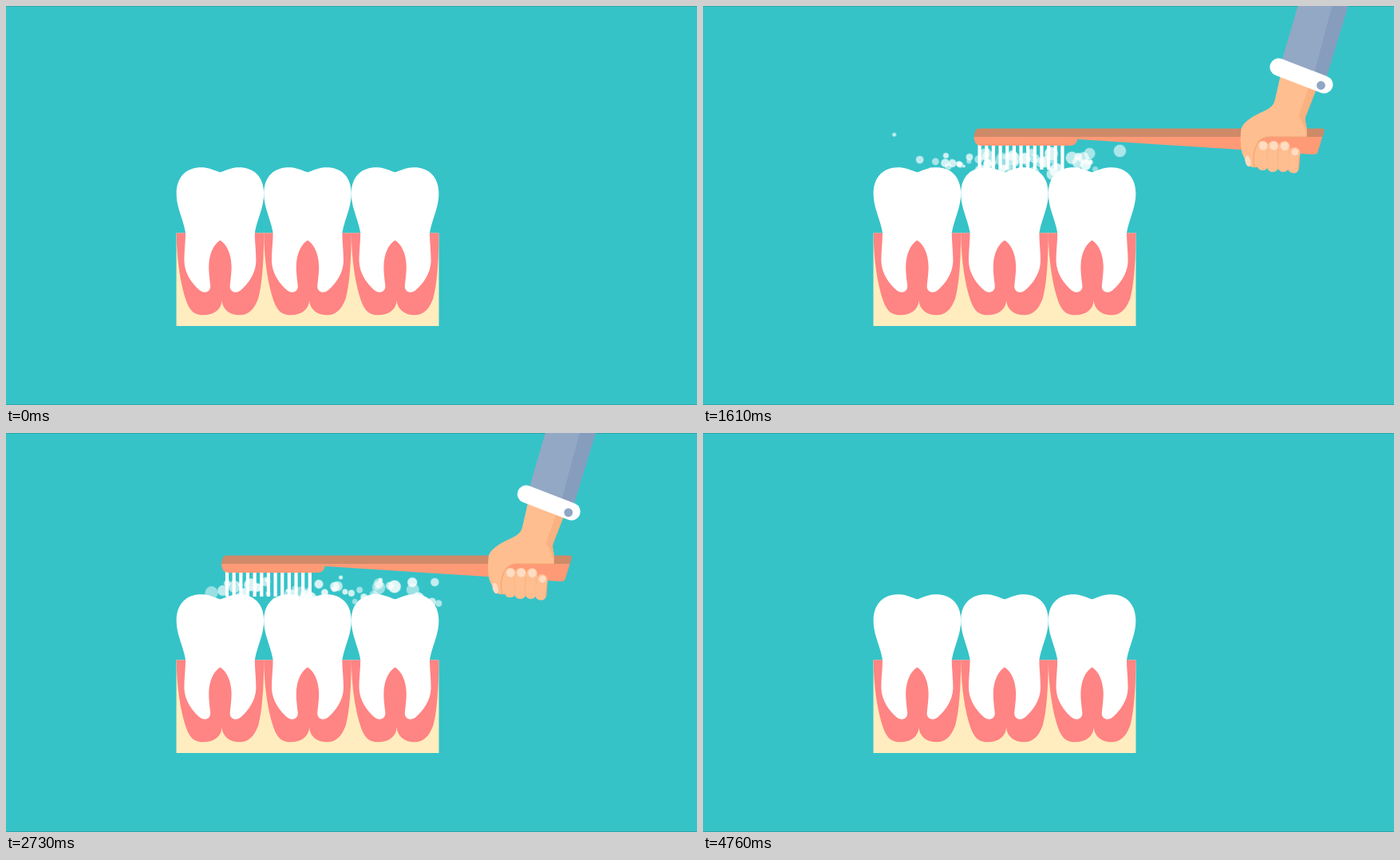
Recreate the animation shown at these times as an HTML page. Size 866 by 500 pixels, loop 5250 ms.

```html
<!DOCTYPE html>
<html lang="en">
<head>
<meta charset="utf-8">
<title>Brushing teeth</title>
<style>
  html, body { margin: 0; width: 100%; height: 100%; overflow: hidden; background: #35c3c8; }
  svg { display: block; width: 100%; height: 100%; }
  .skin { fill: #ffbe8f; }
  .shade { fill: #f9b280; }
  .nail { fill: #ffdcc2; }
  .crease { fill: none; stroke: #f2a675; stroke-width: 1.2; }
  .coral { fill: #ff9a76; }
  .gum { fill: #ff8484; }
  .bubble { fill: #fff; stroke: #fff; stroke-opacity: .3; stroke-width: 1.5; }
</style>
</head>
<body>
<svg viewBox="0 0 866 500" preserveAspectRatio="none">
  <defs>
    <clipPath id="air"><rect y="7" width="866" height="493"/></clipPath>
    <path id="half" fill="#fff" d="M.5 208.5H0C-12 204-16 202.3-24 202.3C-40 202.3-54.8 212-54.8 235C-54.8 253-46 268-43.4 284C-43.4 296-45 306-45 320C-44.4 336-35 348-25.4 356.5C-18 361.5-11 357.5-12.4 349C-14 335-14.2 331-14.2 326C-13.8 310-8 298.5 0 293.5H.5Z"/>
    <g id="tooth">
      <path class="gum" d="M-54.8 284.5C-54.4 320-49.4 350-42.4 370C-37.4 384-30.4 387.3-21.4 387.3C-7.4 387.3 1.6 380 2.1 369C3.1 381 12.6 387.3 24.6 387.3C35.6 387.3 42.6 380 47.6 367C52.6 350 54.6 320 54.9 284.5Z"/>
      <use href="#half"/>
      <use href="#half" transform="scale(-1 1)"/>
    </g>
  </defs>

  <rect width="866" height="500" fill="#35c3c8"/>
  <path d="M0 .5H866M0 499.5H866" stroke="#2ca6aa"/>

  <g id="brush">
    <path d="M258.2 175V205H362.1V175" fill="none"/>
    <path id="bristles" stroke="#fff" stroke-width="4.2"/>
    <path class="coral" d="M251 163.5H688L682 183Q681 186 677 186L660 185L585 180L381 167Q379 175 372 175H259Q251 174 251 163.5Z"/>
    <path fill="#cf8a68" d="M257 153.5H688Q690.5 153.5 690 157L688 164H251Q252 153.5 257 153.5Z"/>

    <path class="skin" d="M636 84L628 119Q626 127 614 132Q589 143 586 154Q584 172 587 184Q592 197 599 202L608 202L606 177Q608 165 622 164L668 164Q669 155 667 147Q665 140 668 134L681 100Z"/>
    <path class="shade" d="M672 98L682 100L668 136Q665 141 667 147Q669 155 668 163Q666 149 658 138Z"/>
    <path class="crease" d="M603 203Q599 186 606 173Q611 163 626 164H668"/>
    <g id="fingers"></g>
    <ellipse class="nail" cx="594.5" cy="194.5" rx="3.4" ry="7" transform="rotate(-14 594.5 194.5)"/>

    <path fill="#93a8c4" d="M675.5 -60L657 0L636 72L692 92L720 0L739 -60Z"/>
    <path fill="#869dbd" d="M718 -60L700 0L677 86L692 92L720 0L739 -60Z"/>
    <path stroke="#fff" stroke-width="22" stroke-linecap="round" d="M633 76.5L690 98.5"/>
    <circle cx="686" cy="99.5" r="5.4" fill="#8fa6c4"/>
  </g>

  <g id="foam" clip-path="url(#air)"></g>

  <path fill="#ffedbf" d="M213.5 284.5H542.5V401H213.5Z"/>
  <use href="#tooth" x="268.4"/>
  <use href="#tooth" x="378"/>
  <use href="#tooth" x="487.6"/>
</svg>

<script>
const LOOP = 5250, STEP = 70;
const HEAD = { x: 251, y: 154 };
const $ = id => document.getElementById(id);

function add(parent, tag, attrs) {
  const el = document.createElementNS('http://www.w3.org/2000/svg', tag);
  for (const k in attrs) el.setAttribute(k, attrs[k]);
  return parent.appendChild(el);
}

let seed = 11;
function rnd() {
  seed = (seed * 16807) % 2147483647;
  return seed / 2147483647;
}
const spread = n => (rnd() * 2 - 1) * n;

// Turning points of the strokes: time, head x, height offset
const strokes = [
  [140, 196, 0], [560, 212, 0], [800, 312, 0], [1035, 250, 0], [1270, 418, 0],
  [1510, 292, 0], [1750, 420, 0], [2220, 250, 2], [2490, 425, 2],
  [2760, 265, 0], [3080, 440, 0], [3500, 480, 0]
];

function pose(t) {
  let i = 0;
  while (i < strokes.length - 2 && t > strokes[i + 1][0]) i++;
  const [t0, x0, y0] = strokes[i], [t1, x1, y1] = strokes[i + 1];
  const k = Math.min(1, Math.max(0, (t - t0) / (t1 - t0)));
  const e = (1 - Math.cos(Math.PI * k)) / 2;
  const enter = Math.max(0, (570 - t) / 430);
  const leave = Math.max(0, (t - 2940) / 600);
  return {
    x: x0 + (x1 - x0) * e,
    y: HEAD.y + y0 + (y1 - y0) * e - 360 * enter ** 2 - 400 * leave ** 2,
    turn: 9 * enter + 9.4 * leave
  };
}

let d = '';
for (let i = 0; i < 13; i++) d += `M${258.2 + i * 8.65} 174V205`;
$('bristles').setAttribute('d', d);

[[606, 169, 37], [619.5, 169, 39], [633.5, 169.5, 38.5], [646.5, 177, 32.5]].forEach(([x, y, h], i) => {
  const g = add($('fingers'), 'g', { transform: `rotate(${i * 1.5} ${x + 7} ${y})` });
  add(g, 'rect', { class: 'skin', x, y, width: 14, height: h, rx: 6.5 });
  add(g, 'path', { class: 'crease', d: `M${x + 13.5} ${y + 11}V${y + h - 5}` });
  add(g, 'ellipse', { class: 'nail', cx: x + 7.5, cy: y + 6, rx: i < 3 ? 5.3 : 4.4, ry: i < 3 ? 5.6 : 4.6 });
});

const bubbles = [];
for (let born = 200; born < 3450; born += 11.5) {
  const p = pose(born);
  const airborne = born < 540 || born > 3020;
  const stray = rnd() < .05;
  const a = p.turn * Math.PI / 180;
  const dx = airborne ? 60 + spread(40) : 4 + rnd() * 112;
  const dy = airborne ? 40 + spread(18) : 43 + spread(13);
  bubbles.push({
    born,
    x: p.x + dx * Math.cos(a) - dy * Math.sin(a),
    y: p.y + dx * Math.sin(a) + dy * Math.cos(a),
    vx: stray ? -.11 * rnd() : spread(.03),
    vy: stray ? .06 * rnd() : spread(.012),
    life: airborne ? 450 + 800 * rnd() : 400 + 850 * rnd() ** 1.5,
    r: stray ? 3 : 2.5 + 6 * rnd(),
    el: add($('foam'), 'circle', { class: 'bubble', opacity: (.45 + .45 * rnd()).toFixed(2) })
  });
}

function draw(t) {
  const p = pose(t);
  const shown = t >= 140 && t < 3560;
  $('brush').setAttribute('visibility', shown ? 'visible' : 'hidden');
  $('brush').setAttribute('transform',
    `translate(${p.x} ${p.y}) rotate(${p.turn}) translate(${-HEAD.x} ${-HEAD.y})`);
  for (const b of bubbles) {
    const age = t - b.born, k = age / b.life;
    const alive = k >= 0 && k < 1;
    b.el.setAttribute('visibility', alive ? 'visible' : 'hidden');
    if (!alive) continue;
    b.el.setAttribute('cx', b.x + b.vx * age);
    b.el.setAttribute('cy', b.y + b.vy * age);
    b.el.setAttribute('r', b.r * Math.min(1, .4 + k * 8, (1 - k) * 4));
  }
}

const start = performance.now();
let last = -1;
function tick() {
  const t = Math.floor(((performance.now() - start) % LOOP) / STEP) * STEP;
  if (t !== last) draw(last = t);
  requestAnimationFrame(tick);
}
tick();
</script>
</body>
</html>
```
